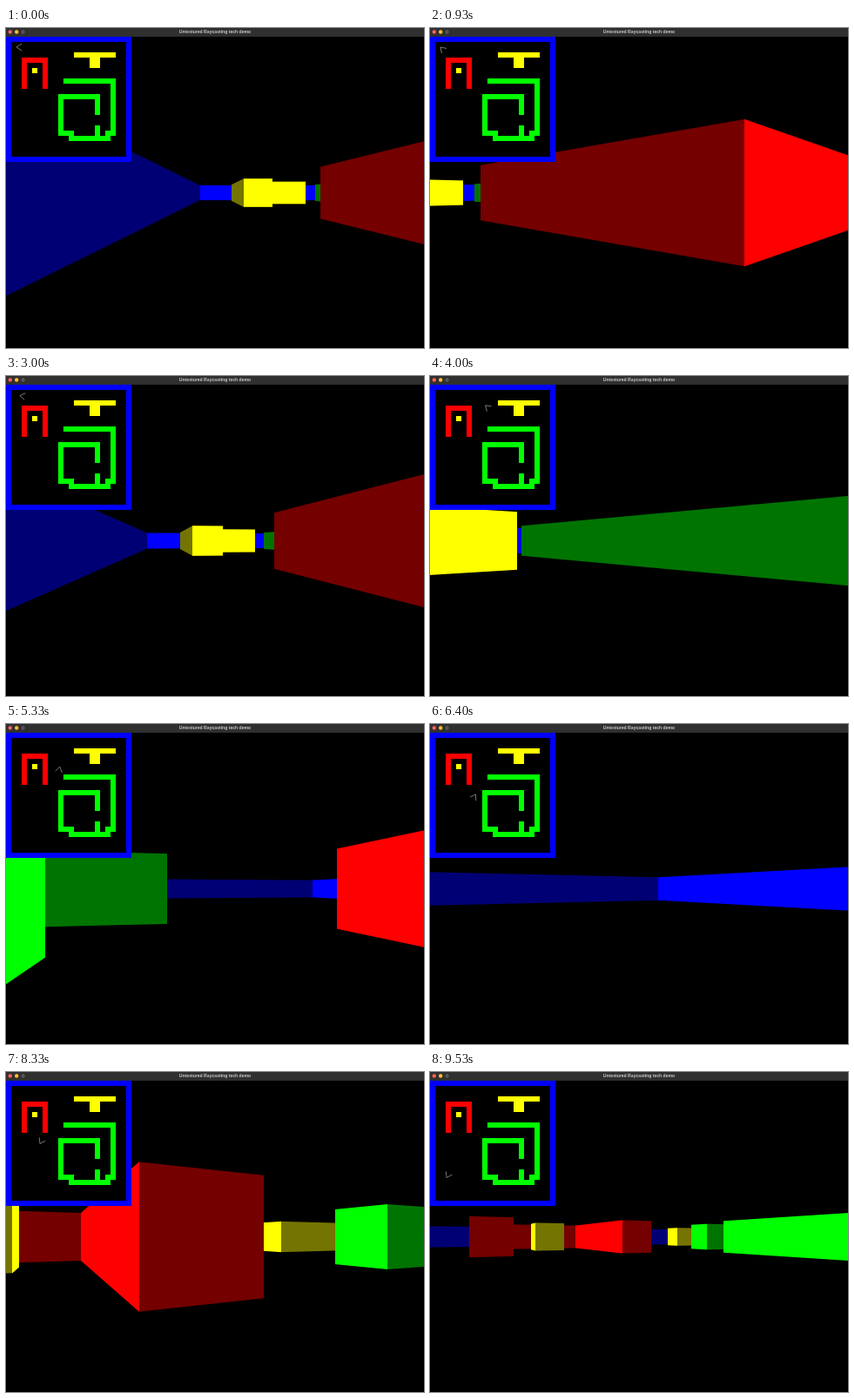
These frames come from a looping animation (480 px wide and 368 px high, 9.74 s). An HTML page with a canvas:

```html
<!DOCTYPE html>
<html lang="en">
<head>
<meta charset="utf-8">
<title>Untextured Raycasting tech demo</title>
<style>
html, body { margin: 0; width: 100%; height: 100%; overflow: hidden; background: #000; }
canvas { display: block; }
</style>
</head>
<body>
<canvas id="stage" width="480" height="368"></canvas>
<script>
const ctx = document.getElementById('stage').getContext('2d');
const W = 480, TOP = 10, VIEW = 359, MID = TOP + VIEW / 2;
const FOV = 0.66, CELL = 6, SIZE = 24, LOOP = 9740;
const TURN = 10, SPEED = 0.55; // degrees and cells per tick of 1/15 s

const COLORS = {
  blue: { lit: '#00f', dim: '#000074' },
  red: { lit: '#f00', dim: '#740000' },
  yellow: { lit: '#ff0', dim: '#747400' },
  green: { lit: '#0f0', dim: '#007400' }
};

// Each wall is a line of cells through its corners
const grid = Array.from({ length: SIZE }, () => []);
function wall(color, corners) {
  const points = corners.split(' ').map(c => c.split(',').map(Number));
  let [x, y] = points[0];
  grid[y][x] = color;
  for (const [tx, ty] of points)
    while (x !== tx || y !== ty) {
      x += Math.sign(tx - x);
      y += Math.sign(ty - y);
      grid[y][x] = color;
    }
}
wall(COLORS.blue, '0,0 23,0 23,23 0,23 0,0');
wall(COLORS.red, '3,9 3,4 7,4 7,9');
wall(COLORS.yellow, '5,6');
wall(COLORS.yellow, '13,3 16,3 16,5 17,5 17,3 20,3');
wall(COLORS.green, '11,8 20,8 20,18 19,18 19,19 12,19 12,18 10,18 10,11 17,11 17,14');
wall(COLORS.green, '17,17 17,18');

// The walk as key presses: ticks of rest, then degrees turned and cells moved
const PRESSES = [
  [9.5, 57, 0], [4.1, 24, 0], [4.4, -72, 0],
  [10.5, 0, 6.735], [0, 37, 2.47], [1, 56.3, 0],
  [8.2, 0, 2.4], [2.9, 4, 3.24],
  [3.3, 0, 1.403], [0, 64, 3.855], [0, 90.9, 0],
  [2.1, 14.3, 0], [1.4, 0, 1.36], [4, 21.5, 0], [4.5, 0, -7.31]
];

function poseAt(tick) {
  let x = 2, y = 2, heading = 0;
  for (const [rest, degrees, dist] of PRESSES) {
    tick -= rest;
    if (tick <= 0) break;
    const length = Math.max(Math.abs(degrees) / TURN, Math.abs(dist) / SPEED);
    const part = Math.min(1, tick / length);
    const half = degrees * part * Math.PI / 360;
    const chord = dist * part * (half ? Math.sin(half) / half : 1);
    x += chord * Math.cos(heading + half);
    y += chord * Math.sin(heading + half);
    heading += 2 * half;
    tick -= length;
  }
  return { x, y, fx: Math.cos(heading), fy: Math.sin(heading) };
}

// Ray direction for s from -1 (left edge) to 1 (right edge)
const ray = (p, s) => [p.fx - p.fy * FOV * s, p.fy + p.fx * FOV * s];

function cast(p, s) {
  const [dx, dy] = ray(p, s);
  let cx = Math.floor(p.x), cy = Math.floor(p.y);
  const gapX = Math.abs(1 / dx), gapY = Math.abs(1 / dy);
  let nextX = (dx < 0 ? p.x - cx : cx + 1 - p.x) * gapX;
  let nextY = (dy < 0 ? p.y - cy : cy + 1 - p.y) * gapY;
  for (;;) {
    const alongX = nextX < nextY;
    const dist = alongX ? nextX : nextY;
    if (alongX) { cx += Math.sign(dx); nextX += gapX; }
    else { cy += Math.sign(dy); nextY += gapY; }
    const hit = grid[cy][cx];
    if (hit) return { dist, color: alongX ? hit.lit : hit.dim };
  }
}

function box(color, x, y, w, h) {
  ctx.fillStyle = color;
  ctx.fillRect(x, y, w, h);
}

function drawView(p) {
  box('#000', 0, TOP, W, VIEW);
  for (let x = 0; x < W; x++) {
    const hit = cast(p, (2 * x + 1) / W - 1);
    const h = Math.min(VIEW, VIEW / hit.dist);
    box(hit.color, x, MID - h / 2, 1, h);
  }
}

function drawMap(p) {
  box('#000', 0, TOP, SIZE * CELL, SIZE * CELL);
  grid.forEach((row, y) => row.forEach((color, x) =>
    box(color.lit, x * CELL, TOP + y * CELL, CELL, CELL)));
  const px = p.x * CELL, py = TOP + p.y * CELL;
  const [l, r] = [ray(p, -1), ray(p, 1)];
  ctx.strokeStyle = '#aaa';
  ctx.lineWidth = 0.7;
  ctx.beginPath();
  ctx.moveTo(px + l[0] * CELL, py + l[1] * CELL);
  ctx.lineTo(px, py);
  ctx.lineTo(px + r[0] * CELL, py + r[1] * CELL);
  ctx.stroke();
}

function drawTitleBar() {
  box('#303030', 0, 0, W, TOP);
  ['#ff5f57', '#febc2e', '#565656'].forEach((color, i) => {
    ctx.fillStyle = color;
    ctx.beginPath();
    ctx.arc(4.8 + i * 7.4, 4.5, 2.2, 0, 7);
    ctx.fill();
  });
  ctx.fillStyle = '#c8c8c8';
  ctx.font = 'bold 5.1px "Liberation Sans", Arial, sans-serif';
  ctx.textAlign = 'center';
  ctx.fillText('Untextured Raycasting tech demo', 240, 6.2);
}

function draw(now) {
  const pose = poseAt(Math.floor((now % LOOP) * 0.015 + 0.06));
  drawView(pose);
  drawMap(pose);
  drawTitleBar();
}

const start = performance.now();
function loop() {
  draw(performance.now() - start);
  requestAnimationFrame(loop);
}
loop();
</script>
</body>
</html>
```
